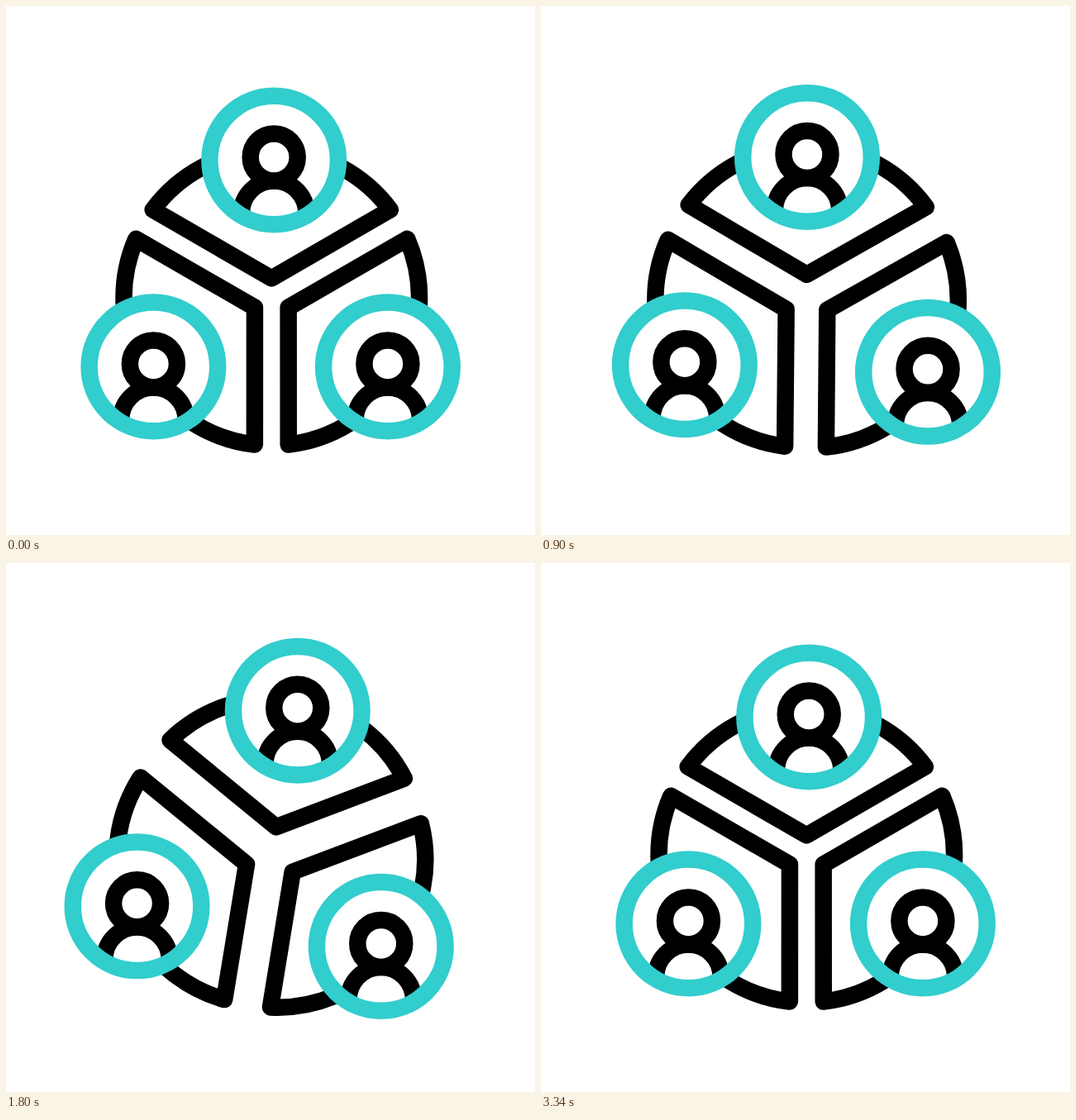
Write an HTML page that moves like this. It is 640 by 640 pixels and loops after 3.6 s.

```html
<!DOCTYPE html>
<html lang="en">
<head>
<meta charset="utf-8">
<title>Team wheel</title>
<style>
  html, body { margin: 0; height: 100%; overflow: hidden; background: #fff; }
  svg { display: block; width: 100vw; height: 100vh; }
</style>
</head>
<body>
<svg viewBox="0 0 640 640" fill="#fff" stroke="#000" stroke-width="20.5" stroke-linejoin="round">
  <clipPath id="disc"><circle r="76"/></clipPath>
  <g id="wheel"></g>
  <g id="people"></g>
</svg>
<script>
const LOOP = 3600, STEP = 20, CX = 321.3, CY = 353;

// Resting badge position around the wheel centre, outward travel, head shift and head scale
const members = [
  { x: 2.9, y: -166.5, travel: 10.6, nod: 4.5, shrink: 0.03 },
  { x: 140.6, y: 83.4, travel: 9.3, nod: -2.6, shrink: 0.055 },
  { x: -142.9, y: 83.4, travel: 8.8, nod: -7, shrink: 0.055 },
];

// Smooth curve through [time, value] keys that comes to rest at each extreme
function track(keys) {
  const slope = i => (keys[i + 1][1] - keys[i][1]) / (keys[i + 1][0] - keys[i][0]);
  const tangents = keys.map(([t], i) => {
    if (!i || i === keys.length - 1) return 0;
    const a = slope(i - 1), b = slope(i);
    const before = t - keys[i - 1][0], after = keys[i + 1][0] - t;
    return a * b <= 0 ? 0 : (after * a + before * b) / (before + after);
  });
  return t => {
    const i = keys.findIndex(k => k[0] > t) - 1;
    if (i < 0) return keys[t < keys[0][0] ? 0 : keys.length - 1][1];
    const [t0, v0] = keys[i], [t1, v1] = keys[i + 1];
    const h = t1 - t0, p = (t - t0) / h, q = 1 - p;
    return v0 * q * q * (1 + 2 * p) + v1 * p * p * (1 + 2 * q)
      + h * p * q * (tangents[i] * q - tangents[i + 1] * p);
  };
}

const turn = track([[0, 0], [270, -3], [540, 20.8], [640, 41.4], [900, 120.5], [1160, 216.6],
  [1480, 320.3], [1620, 349], [1800, 369.3], [1910, 373.5], [2260, 352], [2500, 357.5], [2800, 360]]);
const spread = track([[0, 0], [640, 0.265], [1160, 0.77], [1480, 0.94], [1700, 1],
  [2200, 1], [2500, -1], [2960, 0]]);
const nodding = track([[2200, 0], [2500, 1], [3340, 0]]);

const wheel = document.getElementById("wheel");
const people = document.getElementById("people");
wheel.innerHTML = members.map(() =>
  '<path d="M0-23.5L-143.6-106.5A178.8 178.8 0 0 1 143.6-106.5Z"/>').join("");
people.innerHTML = members.map(() => `<g>
  <circle r="77.8" stroke="none"/>
  <g clip-path="url(#disc)"><circle cy="64.3" r="39.2"/><circle class="head" r="28.5"/></g>
  <circle r="77.8" fill="none" stroke="#32cdcd"/>
</g>`).join("");
const heads = people.querySelectorAll(".head");

function draw(t) {
  const angle = turn(t), rad = angle * Math.PI / 180;
  const cos = Math.cos(rad), sin = Math.sin(rad), nod = nodding(t);
  members.forEach((m, i) => {
    const out = m.travel * spread(t), dir = i * 2 * Math.PI / 3;
    const x = m.x + out * Math.sin(dir), y = m.y - out * Math.cos(dir);
    wheel.children[i].setAttribute("transform",
      `translate(${CX} ${CY}) rotate(${angle + i * 120}) translate(0 ${-out})`);
    people.children[i].setAttribute("transform",
      `translate(${CX + x * cos - y * sin} ${CY + x * sin + y * cos})`);
    heads[i].setAttribute("transform",
      `translate(0 ${m.nod * nod - 3.5}) scale(${1 - m.shrink * nod})`);
  });
}

function tick() {
  const t = performance.now() % LOOP;
  draw(Math.floor(t / STEP) * STEP);
  requestAnimationFrame(tick);
}
tick();
</script>
</body>
</html>
```
